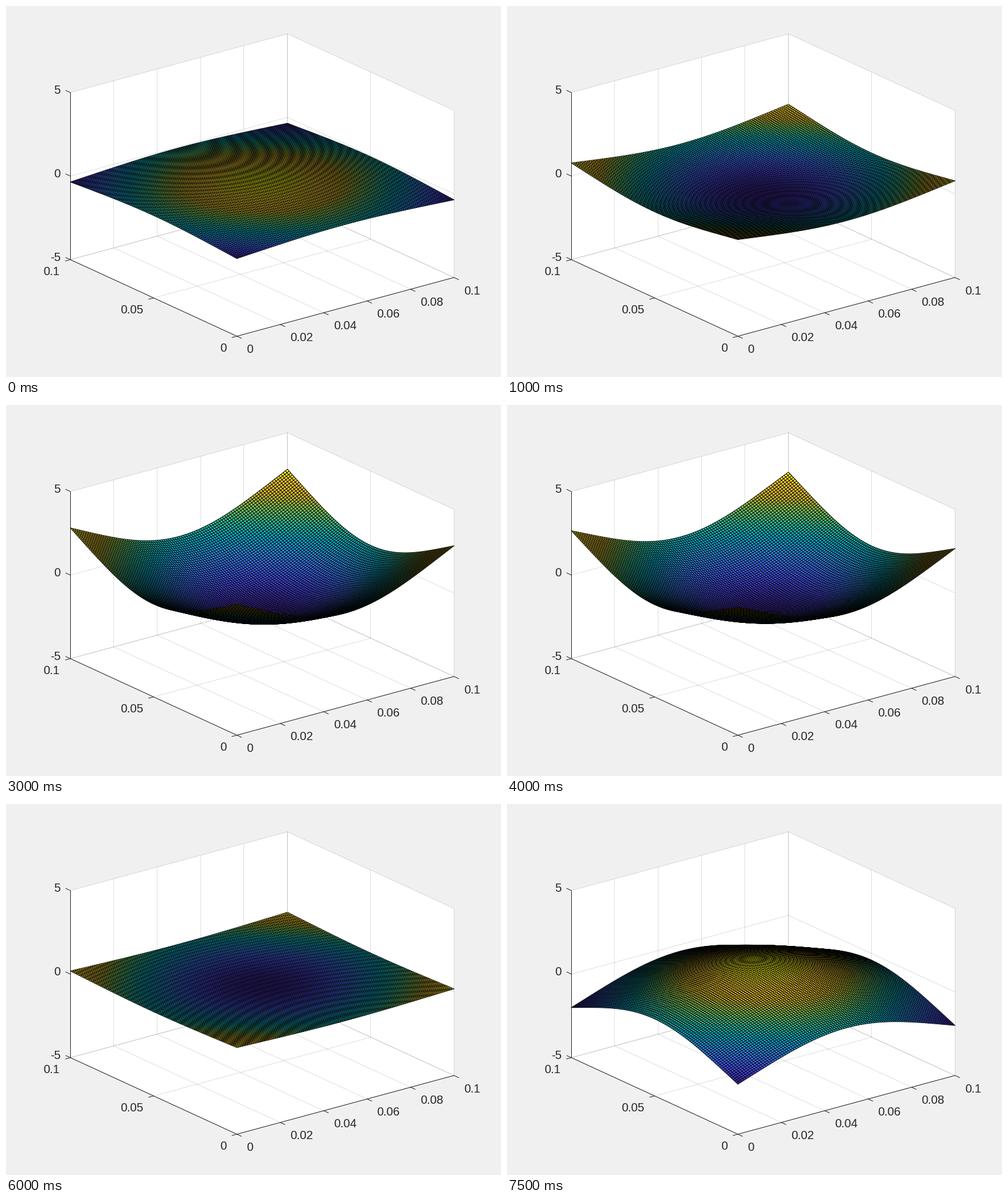
A matplotlib script that plays this animation: 840 px wide and 630 px high, repeating every 8000 ms.

```python
import numpy as np
import matplotlib.pyplot as plt
from matplotlib.animation import FuncAnimation
from matplotlib.collections import PolyCollection
from matplotlib.colors import LinearSegmentedColormap

W, H, DPI = 840, 630, 100
PX = 72 / DPI                      # one pixel in points
FRAMES, STEP = 16, 500
CELLS = 100
INK = "#262626"

# Orthographic view: screen position of the front corner and the unit vectors
ORIGIN = np.array([391.8, 560.7])
EX = np.array([368.4, -99.7])
EY = np.array([-282.6, -130.0])
EZ = np.array([0, -283.75])

PARULA = LinearSegmentedColormap.from_list("parula", [
    (.2422, .1504, .6603), (.2803, .2782, .9221), (.2440, .4358, .9988),
    (.1540, .5902, .9218), (.0297, .7082, .8163), (.1938, .7758, .6251),
    (.5044, .7993, .3480), (.8634, .7406, .1596), (.9892, .8136, .1885),
    (.9769, .9839, .0805)], N=256)


def project(x, y, z):
    """Map unit box coordinates to stage pixels."""
    x, y, z = (np.asarray(v, float)[..., None] for v in (x, y, z))
    return ORIGIN + x * EX + y * EY + z * EZ


fig = plt.figure(figsize=(W / DPI, H / DPI), dpi=DPI, facecolor="#f0f0f0")
ax = fig.add_axes([0, 0, 1, 1])
ax.set_xlim(0, W)
ax.set_ylim(H, 0)
ax.axis("off")


def segment(a, b, **style):
    (x0, y0), (x1, y1) = a, b
    if abs(x0 - x1) < 1e-6:        # keep upright lines on one pixel column
        x0 = x1 = np.floor(x0) + .5
    ax.plot([x0, x1], [y0, y1], lw=PX, snap=False,
            solid_capstyle="butt", **style)


def grid(a, b):
    segment(project(*a), project(*b), color=INK, alpha=.15, zorder=1)


def tick(pos, toward):
    segment(pos, pos + 9 * toward / np.hypot(*toward), color=INK, zorder=2)


def label(pos, dx, dy, text, ha):
    ax.text(pos[0] + dx, pos[1] + dy, text, ha=ha, va="baseline", color=INK,
            fontsize=20 * PX, family="Liberation Sans")


# White walls and floor
outline = project([0, 0, 1, 1, 1, 0], [1, 1, 1, 0, 0, 0], [0, 1, 1, 1, 0, 0])
ax.fill(*outline.T, color="white", lw=0, zorder=0)

for i in range(6):
    x = i / 5
    grid((x, 0, 0), (x, 1, 0))
    grid((x, 1, 0), (x, 1, 1))
    p = project(x, 0, 0)
    tick(p, -EY)
    label(p, 16.7, 28.5, f"{x / 10:g}", "left")

for y in (0, .5, 1):
    grid((0, y, 0), (1, y, 0))
    grid((1, y, 0), (1, y, 1))
    p = project(0, y, 0)
    tick(p, -EX)
    label(p, -17.7, 26.3, f"{y / 10:g}", "right")

for z in (0, .5, 1):
    grid((0, 1, z), (1, 1, z))
    grid((1, 0, z), (1, 1, z))
    p = project(0, 1, z)
    tick(p, EY)
    label(p, -16.7, 2, f"{10 * z - 5:g}", "right")

for end in ((1, 0, 0), (0, 1, 0)):
    segment(ORIGIN, project(*end), color=INK, zorder=2)
segment(project(0, 1, 0), project(0, 1, 1), color=INK, zorder=2)


# Plate shape: sum of the first free-free beam mode along both sides
s = np.linspace(0, 1, CELLS + 1)
b = 4.730041 * s
beam = (np.cosh(b) + np.cos(b) - .982502 * (np.sinh(b) + np.sin(b))) / 2
X, Y = np.meshgrid(s, s, indexing="ij")
MODE = (beam[:, None] + beam[None, :]) / 2

# Each cell is a bare face followed by its two far edges, far cells first
surface = PolyCollection([], closed=False, linewidths=[0, PX],
                         edgecolors=[(0, 0, 0, 0), (0, 0, 0, 1)],
                         joinstyle="round", zorder=3)
ax.add_collection(surface, autolim=False)
rims = [ax.plot([], [], color="black", lw=PX, zorder=4)[0] for _ in range(2)]


def corner_height(k):
    """Corner deflection as a share of the box height."""
    k = max(k, .57)                # the first step is a short one
    return 81.3 / 283.75 * np.sin(.28 * (12.23 - k))


def draw(k):
    z = corner_height(k) * MODE
    p = project(X, Y, .5 + z)
    near, right = p[:-1, :-1], p[1:, :-1]
    far, left = p[1:, 1:], p[:-1, 1:]
    faces = np.stack([near, right, far, left], axis=2)
    edges = np.stack([right, far, left, left], axis=2)
    cells = np.stack([faces, edges], axis=2)[::-1, ::-1]
    surface.set_verts(cells.reshape(-1, 4, 2), closed=False)

    shade = (z - z.min()) / np.ptp(z)
    colors = np.zeros((CELLS, CELLS, 2, 4))
    colors[:, :, 0] = PARULA(shade[:-1, :-1])[::-1, ::-1]
    surface.set_facecolor(colors.reshape(-1, 4))

    rims[0].set_data(*p[0].T)
    rims[1].set_data(*p[:, 0].T)
    return surface, *rims


anim = FuncAnimation(fig, draw, frames=FRAMES, interval=STEP,
                     repeat=True, repeat_delay=0, blit=False)
plt.show()
```
